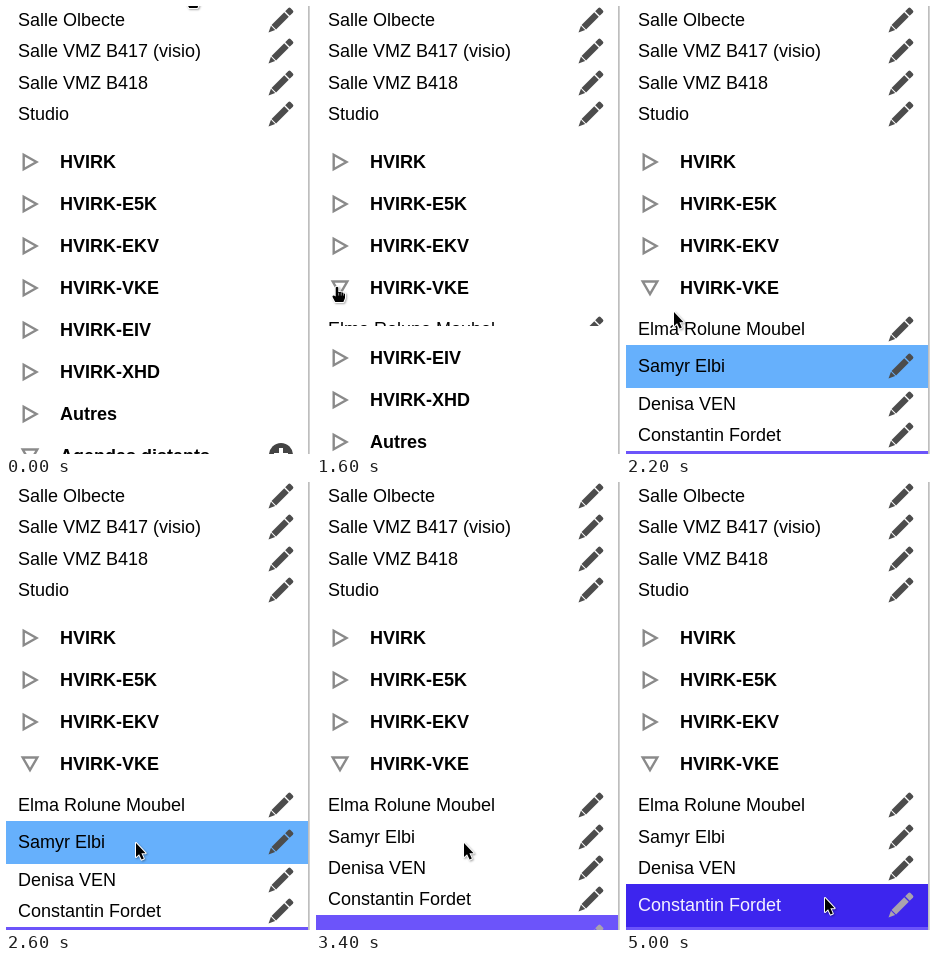
These frames come from a looping animation (304x448 px, 6000 ms). An HTML page with a canvas:

```html
<!DOCTYPE html>
<html lang="fr">
<head>
<meta charset="utf-8">
<style>
html, body { margin: 0; width: 100%; height: 100%; overflow: hidden; background: #fff; }
canvas { display: block; }
</style>
</head>
<body>
<canvas id="stage" width="304" height="448"></canvas>
<script>
const W = 304, H = 448, LOOP = 6000, STEP = 200;
const ROW = 31.4, SELECTED_ROW = 42.9, EDGE = 302;
const ctx = document.getElementById('stage').getContext('2d');

const rooms = ['Salle Olbecte', 'Salle VMZ B417 (visio)', 'Salle VMZ B418', 'Studio'];
const groups = ['HVIRK', 'HVIRK-E5K', 'HVIRK-EKV', 'HVIRK-VKE', 'HVIRK-EIV', 'HVIRK-XHD',
  'Autres', 'Agendas distants'];
const people = ['Elma Rolune Moubel', 'Samyr Elbi', 'Denisa VEN', 'Constantin Fordet'];
const OPEN_GROUP = 3;

// [time, cursor shape, x, y]
const pointer = [
  [0, 'hand', 185, -13], [200, 'hand', 140, 33], [400, 'arrow', 109, 102],
  [600, 'arrow', 58, 211], [800, 'arrow', 38, 259], [1000, 'arrow', 17, 276],
  [1200, 'hand', 21, 281], [2200, 'arrow', 48, 306], [2400, 'arrow', 106, 350],
  [2600, 'arrow', 130, 361], [2800, 'arrow', 140, 361], [3000, 'arrow', 146, 361],
  [3200, 'arrow', 148, 361], [3600, 'arrow', 152, 367], [4000, 'arrow', 178, 395],
  [4400, 'arrow', 198, 417], [4600, 'arrow', 199, 416]
];
// [time, height added by the open list]
const opening = [[0, 0], [1600, 28], [1800, 111], [2000, 600]];

const arrowPath = new Path2D('M0 0V14L3.1 11.2L5.6 16.6L7.8 15.6L5.4 10.3H9.6Z');
const handPath = new Path2D('M-1.3 0.4Q0 -0.8 1.3 0.4V5.2L3.4 4.8L4.3 5.6L6 5.4L6.8 6.4L8 6.8V11' +
  'L6.4 15H-1.8L-4.6 9.8Q-4.2 7.2 -1.3 9.4Z');

const at = (keys, t) => keys.filter(k => k[0] <= t).pop();

function text(label, x, y, color = '#000', weight = '') {
  ctx.font = `${weight} 18px "Liberation Sans", Arial, sans-serif`;
  ctx.fillStyle = color;
  ctx.fillText(label, x, y);
}

function pencil(cy, color) {
  ctx.save();
  ctx.translate(262.5, cy + 12.5);
  ctx.rotate(-Math.PI / 4);
  ctx.fillStyle = color;
  ctx.beginPath();
  ctx.moveTo(0, 0);
  ctx.lineTo(6.5, -3);
  ctx.lineTo(6.5, 3);
  ctx.fill();
  ctx.fillRect(7.5, -3.2, 18, 6.4);
  ctx.beginPath();
  ctx.roundRect(26.8, -3.2, 6, 6.4, [0, 1.5, 1.5, 0]);
  ctx.fill();
  ctx.restore();
}

function triangle(cy, open) {
  const points = open ? [[16.7, cy - 6.5], [31.3, cy - 6.5], [24, cy + 6]]
                      : [[17.7, cy - 7.2], [17.7, cy + 7.2], [30.5, cy]];
  ctx.beginPath();
  points.forEach(p => ctx.lineTo(...p));
  ctx.closePath();
  ctx.strokeStyle = '#8a8a8a';
  ctx.lineWidth = 2.4;
  ctx.stroke();
}

function plusButton(cy) {
  ctx.fillStyle = '#444';
  ctx.beginPath();
  ctx.arc(275, cy, 12, 0, 7);
  ctx.fill();
  ctx.fillStyle = '#fff';
  ctx.fillRect(273, cy - 7, 4, 14);
  ctx.fillRect(268, cy - 2, 14, 4);
}

function group(i, shift, opened) {
  const cy = 156 + 42 * i + shift;
  triangle(cy, i === groups.length - 1 || (i === OPEN_GROUP && opened));
  text(groups[i], 54, cy + 6, '#000', 'bold');
  if (i === groups.length - 1) plusButton(cy - 1);
}

function agenda(label, top, band, dark) {
  const height = band ? SELECTED_ROW : ROW;
  if (band) {
    ctx.fillStyle = band;
    ctx.fillRect(0, Math.round(top), EDGE, Math.round(top + height) - Math.round(top));
  }
  const cy = Math.round(top + height / 2);
  text(label, 12, cy + 6, dark ? '#f4f2ff' : '#000');
  pencil(cy, dark ? '#aaa3ad' : '#4c4c4c');
  return top + height;
}

function agendaList(t, shift) {
  ctx.save();
  ctx.beginPath();
  ctx.rect(0, 300, W, Math.max(0, shift - 8));
  ctx.clip();
  const bands = [
    null,
    t < 3400 ? '#66b0fc' : null,
    null,
    t < 4600 ? null : t < 4800 ? '#5540f4' : '#3d25ee'
  ];
  let top = 307.6;
  people.forEach((name, i) => { top = agenda(name, top, bands[i], i === 3 && bands[i]); });
  agenda('', top, '#6c54fa', true);
  ctx.restore();
}

function cursor([, shape, x, y]) {
  const path = shape === 'hand' ? handPath : arrowPath;
  ctx.save();
  ctx.translate(x, y);
  ctx.lineJoin = 'round';
  ctx.shadowColor = 'rgba(0,0,0,.35)';
  ctx.shadowBlur = 2;
  ctx.shadowOffsetX = ctx.shadowOffsetY = 1;
  ctx.strokeStyle = '#fff';
  ctx.lineWidth = 2;
  ctx.stroke(path);
  ctx.shadowColor = 'transparent';
  ctx.fillStyle = '#000';
  ctx.fill(path);
  if (shape === 'hand') {
    ctx.fillStyle = '#bbb';
    for (const kx of [1.4, 3.8, 6]) ctx.fillRect(kx, 6, 0.7, 2.6);
  }
  ctx.restore();
}

function draw(t) {
  ctx.fillStyle = '#fff';
  ctx.fillRect(0, 0, W, H);
  rooms.forEach((name, i) => {
    const cy = Math.round(14 + i * ROW);
    text(name, 12, cy + 6);
    pencil(cy, '#4c4c4c');
  });
  const shift = at(opening, t)[1];
  groups.forEach((_, i) => group(i, i > OPEN_GROUP ? shift : 0, t >= 1200));
  if (shift) agendaList(t, shift);
  ctx.fillStyle = '#bebebe';
  ctx.fillRect(EDGE, 0, 1.7, H);
  cursor(at(pointer, t));
}

const start = performance.now();
function tick() {
  const t = (performance.now() - start) % LOOP;
  draw(Math.floor(t / STEP) * STEP);
  requestAnimationFrame(tick);
}
tick();
</script>
</body>
</html>
```
